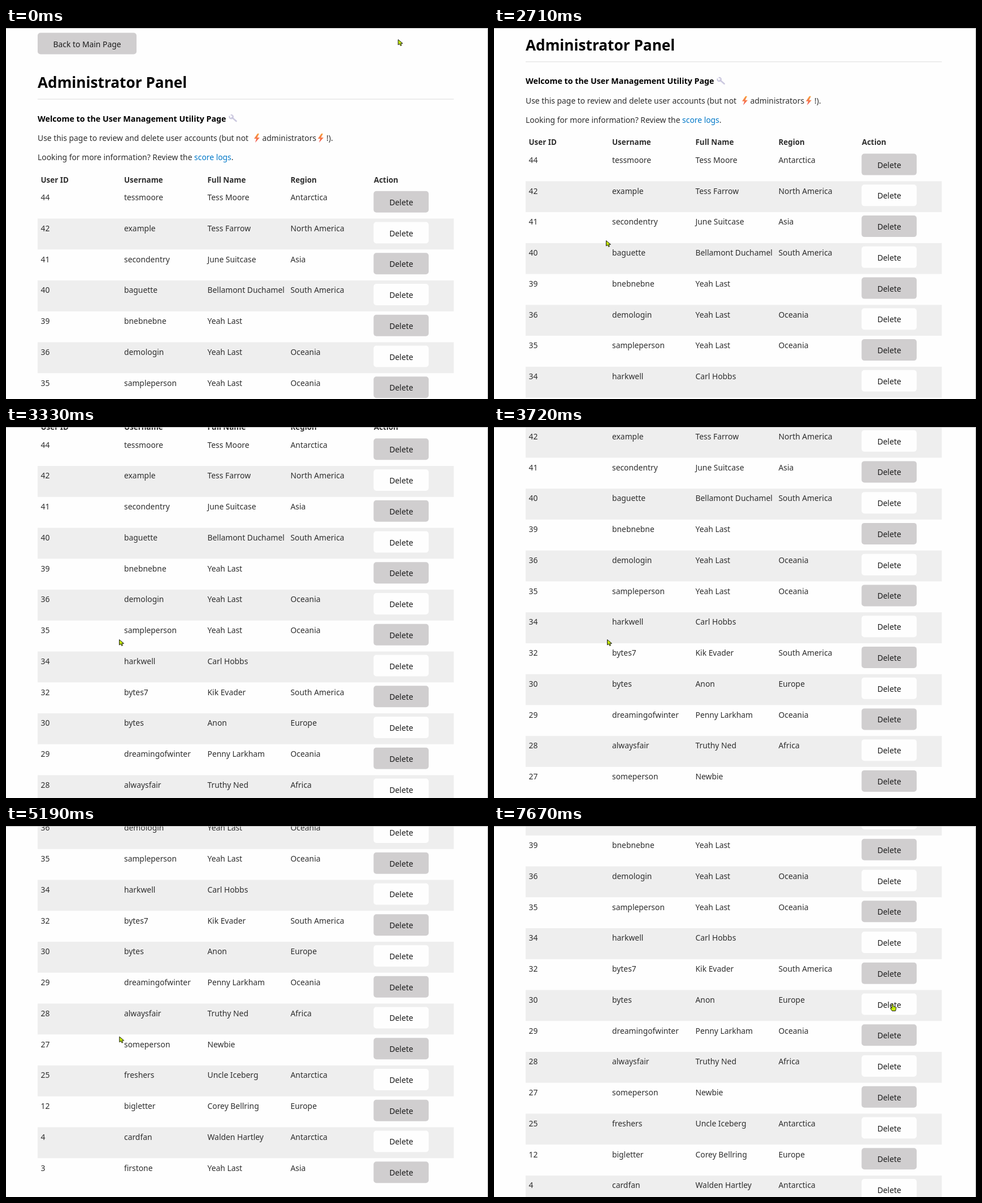
An HTML page for the animation above (8000 ms loop, 853 by 657 pixels).

```html
<!DOCTYPE html>
<html lang="en">
<head>
<meta charset="utf-8">
<title>Administrator Panel</title>
<style>
  html, body { margin: 0; width: 100%; height: 100%; overflow: hidden; background: #fefefe; }
  svg { display: block; width: 100%; height: 100%; }
  text { font: 13.87px "Noto Sans", "Open Sans", sans-serif; fill: #2e2e2e; white-space: pre; }
  .title { font-size: 26.2px; font-weight: 600; fill: #000; }
  .lead { font-size: 14.25px; font-weight: 600; fill: #000; }
  .head { font-size: 13.4px; font-weight: 600; }
  .label { text-anchor: middle; fill: #1c1c1c; }
  .link { fill: #0078c8; }
  .stripe { fill: #eee; }
  .button { fill: #d0cecf; }
  .button.light { fill: #fefefe; }
  .selection { fill: #9b9b9b; }
  .pointer { fill: #c3ea08; stroke: #1a1a1a; stroke-linejoin: round; }
</style>
</head>
<body>
<svg viewBox="0 0 853 657">
  <defs>
    <linearGradient id="flame" x2="0" y2="1">
      <stop offset="0" stop-color="#f9a23c"/>
      <stop offset="1" stop-color="#f2545c"/>
    </linearGradient>
    <path id="bolt" d="M6 0 0 9h4L2 16 10 7H5.500L9 0z" fill="url(#flame)"/>
  </defs>

  <g id="page">
    <rect class="button" x="56" y="8.500" width="175" height="38" rx="5"/>
    <text class="label" x="143.500" y="33.500">Back to Main Page</text>
    <text class="title" x="56" y="106">Administrator Panel</text>
    <rect x="56" y="125.500" width="736.500" height="1" fill="#dedede"/>
    <text class="lead" x="56" y="165.500">Welcome to the User Management Utility Page</text>
    <g fill="none" stroke="#cbc8df" stroke-width="2.600" stroke-linecap="round">
      <path d="M400 158.500 407.500 165"/>
      <path d="M395.500 156.500a3.200 3.200 0 1 0 3-2.500" stroke-width="2.200"/>
    </g>
    <text x="56" y="200">Use this page to review and delete user accounts (but not</text>
    <use href="#bolt" x="439" y="187"/>
    <text x="453.500" y="200">administrators</text>
    <use href="#bolt" x="552" y="187"/>
    <text x="567" y="200">!).</text>
    <text x="56" y="234">Looking for more information? Review the <tspan class="link">score logs</tspan>.</text>
    <g id="table"></g>
  </g>

  <path d="M0 .5H852.500V657" fill="none" stroke="#b9b9b9"/>

  <g class="pointer">
    <path id="arrow" d="M.5 .5V10L3 8 4.800 11.500 6.500 10.700 5 7.300H8.500z"/>
    <path id="hand" d="M-1.500 1.500Q0-.5 1 1.500V5L5 6Q6.500 6.500 6 9L5 13H-1L-4 8.500Q-3.500 6.500-1.500 8z"/>
  </g>
</svg>

<script>
const LOOP = 8000;
const ROW_TOP = 282.75, ROW_HEIGHT = 54.75;
const COLUMNS = [61.5, 209, 356.5, 503.5, 651];
const SELECTED_ROW = 9;

const users = `44|tessmoore|Tess Moore|Antarctica
42|example|Tess Farrow|North America
41|secondentry|June Suitcase|Asia
40|baguette|Bellamont Duchamel|South America
39|bnebnebne|Yeah Last|
36|demologin|Yeah Last|Oceania
35|sampleperson|Yeah Last|Oceania
34|harkwell|Carl Hobbs|
32|bytes7|Kik Evader|South America
30|bytes|Anon|Europe
29|dreamingofwinter|Penny Larkham|Oceania
28|alwaysfair|Truthy Ned|Africa
27|someperson|Newbie|
25|freshers|Uncle Iceberg|Antarctica
12|bigletter|Corey Bellring|Europe
4|cardfan|Walden Hartley|Antarctica
3|firstone|Yeah Last|Asia`.split("\n").map(line => line.split("|"));

// [time, scroll offset]; neighbouring times make a hard step
const scrollKeys = [
  [2649, 0], [2650, 40], [2790, 100], [2970, 187.3], [3050, 190], [3200, 250], [3420, 281],
  [3719, 281], [3720, 337.5], [3790, 362], [3860, 374.6],
  [4639, 374.6], [4640, 443], [4720, 468], [4900, 562], [5000, 578.6],
  [5180, 578.6], [5260, 520], [5400, 485]
];

// [time, x, y] of the pointer's tip
const pointerKeys = [
  [240, 693.5, 20], [330, 560, 170], [420, 350, 390], [510, 226, 515],
  [720, 226, 515], [850, 400, 615], [980, 620, 520], [1110, 650, 260],
  [1230, 460, 90], [1350, 190, 190], [1480, 141, 362],
  [1550, 185, 370], [1620, 245, 380], [1700, 283.5, 385],
  [2100, 283.5, 385], [2250, 225, 388], [2370, 179, 380], [2490, 198, 376],
  [2970, 198, 376], [3200, 200, 376], [5180, 200, 376], [5400, 206, 309],
  [5460, 209, 308], [6240, 457, 308], [6330, 475, 308], [6540, 539, 308],
  [6780, 543, 307], [6870, 552, 307], [7080, 558, 310], [7170, 568, 312],
  [7360, 585, 312], [7520, 670, 315], [7670, 705.5, 314.5]
];

const byId = id => document.getElementById(id);
const table = byId("table");

function add(tag, attributes, content = "") {
  const node = document.createElementNS("http://www.w3.org/2000/svg", tag);
  for (const key in attributes) node.setAttribute(key, attributes[key]);
  node.textContent = content;
  return table.appendChild(node);
}

function valueAt(keys, time) {
  const next = keys.findIndex(key => key[0] > time);
  if (next === 0) return keys[0].slice(1);
  if (next < 0) return keys[keys.length - 1].slice(1);
  const from = keys[next - 1], to = keys[next];
  const part = (time - from[0]) / (to[0] - from[0]);
  return from.slice(1).map((value, i) => value + (to[i + 1] - value) * part);
}

["User ID", "Username", "Full Name", "Region", "Action"].forEach((name, i) =>
  add("text", { class: "head", x: COLUMNS[i], y: 273.5 }, name));

const selectable = [];
users.forEach((user, row) => {
  const y = ROW_TOP + row * ROW_HEIGHT;
  const striped = row % 2 === 1;
  if (striped) add("rect", { class: "stripe", x: 56, y, width: 736.5, height: ROW_HEIGHT });
  user.forEach((value, i) => {
    const x = COLUMNS[i];
    const canSelect = row === SELECTED_ROW && i > 0;
    const mark = canSelect && add("rect", { class: "selection", x, y: y + 6.5, width: 0, height: 20 });
    const label = add("text", { x, y: y + 22.3 }, value);
    if (canSelect) selectable.push({ x, mark, label });
  });
  add("rect", { class: striped ? "button light" : "button", x: 650.5, y: y + 6, width: 97.5, height: 38, rx: 5 });
  add("text", { class: "label", x: 699.5, y: y + 31 }, "Delete");
});

function draw() {
  const time = performance.now() % LOOP;
  const [scroll] = valueAt(scrollKeys, time);
  const [x, y] = valueAt(pointerKeys, time);
  byId("page").setAttribute("transform", `translate(0 ${-scroll})`);

  const overButton = x > 651 && time > 7360;
  byId("arrow").style.display = overButton ? "none" : "";
  byId("hand").style.display = overButton ? "" : "none";
  document.querySelector(".pointer").setAttribute("transform", `translate(${x} ${y})`);

  const dragging = time >= 5460 && time < 7360;
  for (const cell of selectable) {
    const width = dragging ? Math.max(0, Math.min(x - cell.x, cell.label.getComputedTextLength())) : 0;
    cell.mark.setAttribute("width", width);
    cell.label.style.fill = width ? "#000" : "";
  }
  requestAnimationFrame(draw);
}
draw();
</script>
</body>
</html>
```
